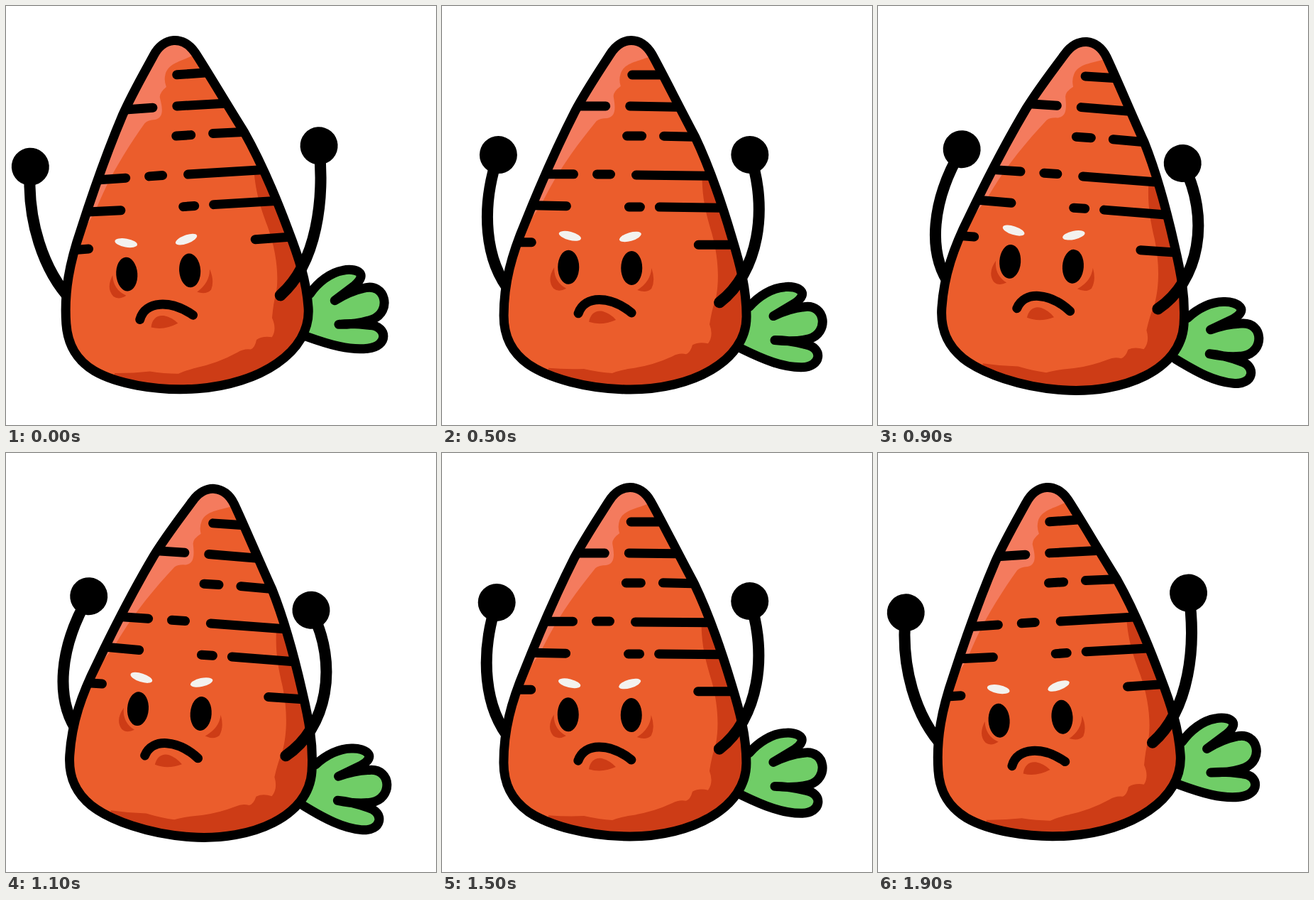
Animation, 606 px wide and 590 px high, one loop 2000 ms. Source, as an HTML page:

```html
<!DOCTYPE html>
<html lang="en">
<head>
<meta charset="utf-8">
<title>Grumpy carrot</title>
<style>
  html, body { margin: 0; height: 100%; overflow: hidden; background: #fff; }
  svg { display: block; width: 100%; height: 100%; }
  .line { fill: none; stroke: #000; stroke-width: 13; stroke-linecap: round; stroke-linejoin: round; }
  .arm { stroke-width: 16; }
  .shade { fill: #cd3c16; }
</style>
</head>
<body>
<svg viewBox="0 0 606 590">
  <defs>
    <path id="outline" d="M236 68C252 42 280 42 295 68C309 93 334 143 356 184C378 230 394 278 408 325C420 364 429 398 429 437C429 500 352 540 265 540C205 540 150 524 122 505C98 488 87 466 87 436C87 390 98 350 117 305C135 260 158 205 187 148C203 118 222 90 236 68Z"/>
    <clipPath id="inside"><use href="#outline"/></clipPath>
  </defs>
  <g id="carrot">
    <g id="leaf">
      <path class="line" style="fill:#70cd67" d="M422 482C455 498 480 508 506 508C536 508 537 480 513 476Q490 470 469 470Q498 473 517 468C546 460 541 418 510 423Q490 425 467 436L497 418C520 402 500 393 483 395C465 396 446 408 433 423"/>
    </g>
    <path id="leftArm" class="line arm"/>
    <circle id="leftHand" r="26.5"/>

    <use href="#outline" fill="#eb5d2c"/>
    <g clip-path="url(#inside)">
      <path fill="#f47b5e" d="M290 72C276 78 256 80 251 95Q248 104 251 113Q240 121 241 128C243 140 246 156 232 158Q222 158 217 162C190 195 165 230 147 265Q135 290 118 308L80 300L200 40H295Z"/>
      <path class="shade" d="M366 236C366 270 371 290 380 320C389 352 391 385 386 410Q380 428 377 448Q383 464 375 475Q362 472 353 477Q350 488 344 490Q334 488 325 493Q295 507 262 511Q248 514 240 517Q222 516 200 511Q175 512 150 510V560H450V236Z"/>
    </g>
    <path class="line" d="M267 97H307M195 141H230M264 141L330 142M260 183H281M312 183L354 184M148 237H185M218 237H237M273 238L377 239M128 281L175 282M263 283H279M306 283L393 284M110 333H126M361 336H409"/>
    <use href="#outline" class="line"/>

    <g id="face">
      <path class="shade" d="M158 368Q157 388 175 398Q164 404 157 398Q147 386 158 368M295 369Q294 388 275 400Q288 405 295 398Q301 386 295 369M207 445C209 433 217 428 226 430Q237 433 245 442Q225 451 207 445"/>
      <ellipse cx="178" cy="368" rx="15" ry="24"/>
      <ellipse cx="267" cy="369" rx="15" ry="24"/>
      <g fill="#f3f2ef">
        <ellipse rx="16" ry="6" transform="translate(180 324) rotate(14)"/>
        <ellipse rx="16" ry="6" transform="translate(265 325) rotate(-16)"/>
      </g>
      <path class="line" d="M192 433C201 407 237 408 267 432"/>
    </g>

    <path id="rightArm" class="line arm"/>
    <circle id="rightHand" r="26.5"/>
  </g>
</svg>
<script>
const LOOP = 2000, STEP = 100;
const set = (id, name, value) => document.getElementById(id).setAttribute(name, value);

// The shoulder stays put; the upper arm follows the hand by a fraction of its shift.
function bendArm(side, [shoulder, lower, upper, hand], shift, follow) {
  const x = hand[0] + shift, y = hand[1] + shift * shift / 400;
  set(side + 'Arm', 'd', `M${shoulder}C${lower} ${upper[0] + shift * follow},${upper[1]} ${x},${y}`);
  set(side + 'Hand', 'cx', x);
  set(side + 'Hand', 'cy', y);
}

function draw(now) {
  const t = Math.floor(now % LOOP / STEP) * STEP + 10;
  const sway = -Math.cos(2 * Math.PI * t / LOOP);      // eased, -1 to 1 and back
  const swing = 1 - 2 * Math.abs(1 - 2 * t / LOOP);    // linear, -1 to 1 and back

  set('carrot', 'transform', `rotate(${4 * sway} 251 473)`);
  set('leaf', 'transform', `rotate(${2.2 * swing} 300 437)`);
  set('face', 'transform', `translate(${0.9 * swing} ${-4.3 * swing})`);
  bendArm('left', [[98, 405], [60, 360], [53, 285], [78.3, 210]], 26.8 * swing, 0.45);
  bendArm('right', [[391, 417], [446, 375], [460, 285], [433.8, 209]], -26.6 * swing, 0.1);
  requestAnimationFrame(draw);
}

requestAnimationFrame(draw);
</script>
</body>
</html>
```
